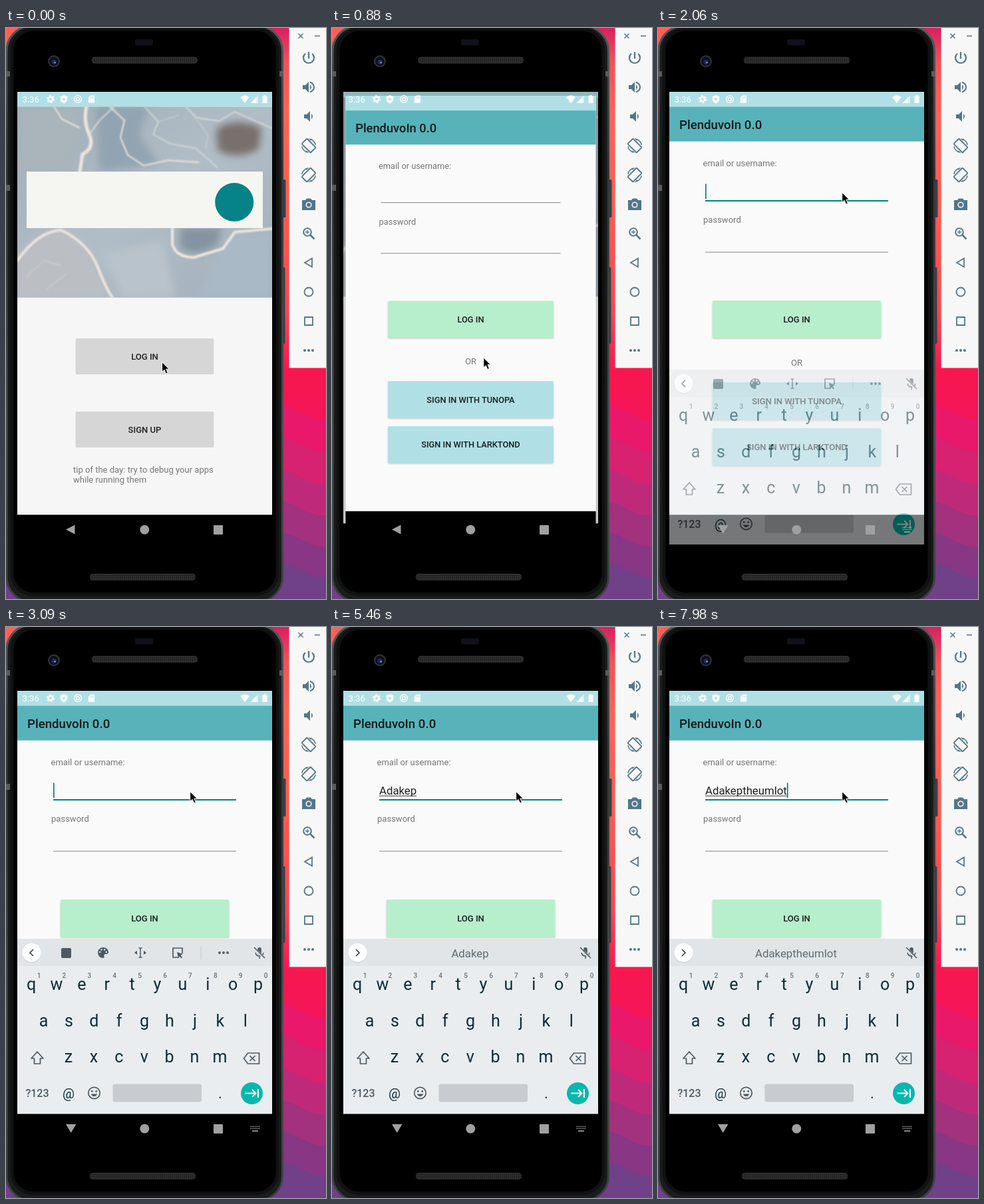
These frames come from a looping animation (481x859 px, 8 s). An HTML page:

```html
<!DOCTYPE html>
<html lang="en">
<head>
<meta charset="utf-8">
<title>Phone login</title>
<style>
html,body{margin:0;width:100%;height:100%;overflow:hidden;background:#000}
svg{display:block;width:100vw;height:100vh;font-family:Roboto,sans-serif}
</style>
</head>
<body>
<svg id="stage" viewBox="0 0 481 859" preserveAspectRatio="none"></svg>
<script>
const stage = document.getElementById('stage');
const TEAL = '#008577', AQUA = '#b0e0e6', SLATE = '#53768a', KEY = '#0d2c38', DIM = '#4d5a62';

const rect = (x, y, w, h, fill, more = '') =>
  `<rect x="${x}" y="${y}" width="${w}" height="${h}" fill="${fill}" ${more}/>`;
const circle = (x, y, r, fill, more = '') =>
  `<circle cx="${x}" cy="${y}" r="${r}" fill="${fill}" ${more}/>`;
const path = (d, fill, more = '') => `<path d="${d}" fill="${fill}" ${more}/>`;
const line = (d, color, w = 1, more = '') =>
  path(d, 'none', `stroke="${color}" stroke-width="${w}" ${more}`);
const ring = (x, y, r, color, w) => circle(x, y, r, 'none', `stroke="${color}" stroke-width="${w}"`);
const text = (x, y, s, size, fill, more = '') =>
  `<text x="${x}" y="${y}" font-size="${size}" fill="${fill}" ${more}>${s}</text>`;
const MID = 'text-anchor="middle"', MED = 'font-weight="500"', LABEL = `${MID} ${MED}`;
const at = (x, y, body, more = '') => `<g transform="translate(${x} ${y}) ${more}">${body}</g>`;
const gradient = (id, stops, dir = 'x2="0" y2="1"') =>
  `<linearGradient id="${id}" ${dir}>` +
  stops.map(([o, c]) => `<stop offset="${o}" stop-color="${c}"/>`).join('') + '</linearGradient>';
const clip = (id, y, h) => `<clipPath id="${id}">${rect(17, y, 383, h, '#000')}</clipPath>`;

function defs() {
  return '<defs>' +
    gradient('wall', [[0, '#d91f5e'], [.06, '#f4505a'], [.15, '#ff6255'], [.32, '#ff5a4f'],
      [.5, '#ff4350'], [.6, '#f7174f'], [.7, '#f3155b']]) +
    gradient('photo', [[0, '#9fadb8'], [.5, '#b1bdc6'], [1, '#a2b0bc']], 'x2="1" y2="1"') +
    gradient('edge', [[0, '#55585a'], [.25, '#343637'], [.7, '#4a4c4e'], [1, '#3c3e3f']]) +
    '<pattern id="mesh" width="3" height="3" patternUnits="userSpaceOnUse">' +
      rect(0, 0, 3, 3, '#303030') + circle(1.5, 1.5, .9, '#151515') + '</pattern>' +
    '<filter id="soft" x="-20%" y="-20%" width="140%" height="140%"><feGaussianBlur stdDeviation="6"/></filter>' +
    '<filter id="fine" x="-20%" y="-20%" width="140%" height="140%"><feGaussianBlur stdDeviation="1"/></filter>' +
    clip('screen', 96, 681) + clip('hero', 118.4, 287) + '</defs>';
}

function wallpaper() {
  const bands = [[570, '#ea186a'], [618, '#d72171'], [668, '#be2a79'], [715, '#a2317e'], [762, '#873783'], [808, '#704089']];
  return rect(0, 0, 481, 859, 'url(#wall)') + rect(0, 0, 60, 60, '#ff5f55') + bands.map(([y, c]) =>
    path(`M0 ${y}H400C430 ${y - 12} 450 ${y + 22} 481 ${y + 18}V859H0Z`, c)).join('');
}

function phone() {
  const speaker = (x, y) => rect(x, y, 158, 9, 'url(#mesh)', 'rx="4" stroke="#3d3d3d" stroke-width=".8"');
  return rect(415, 228, 5.5, 57, '#3d3f41', 'rx="1.5"') + rect(415, 360, 4.5, 115, '#3d3f41', 'rx="1.5"') +
    rect(1, -3, 414.5, 866, '#1b1c1d', 'rx="37" stroke="url(#edge)" stroke-width="3"') +
    rect(9, 2, 399, 850, '#000', 'rx="32" stroke="#101111" stroke-width="5"') +
    rect(0, 65, 6, 8, '#5a5c5d') + rect(0, 236, 6, 9, '#5a5c5d') + rect(411, 65, 6, 8, '#5a5c5d') +
    speaker(129.5, 44) + speaker(126.5, 821.5) +
    rect(194, 17, 27, 9, '#10111a', 'rx="2.5"') +
    circle(72, 50, 9, '#303133') + circle(72, 50, 6.8, '#0c1020') +
    circle(72, 51, 3.6, '#1b2c61') + circle(73.5, 52, 1.2, '#8da5ee');
}

function photo() {
  const vein = (d, w, c = '#eee5dc') => line(d, c, w, 'filter="url(#fine)" stroke-linecap="round"');
  return `<g clip-path="url(#hero)">` + rect(17, 118, 383, 288, 'url(#photo)') +
    `<g filter="url(#soft)">` +
    path('M17 118H105L118 160L90 216H17Z', '#a9b4bb') +
    path('M135 118H215L200 160L230 205L140 216Z', '#92a4b2') +
    path('M17 345Q50 300 90 302Q130 325 155 405H17Z', '#bbbfc4') +
    path('M316 152Q345 132 384 150L380 182Q348 200 318 184Z', '#77706c') +
    path('M262 300H325L318 326Q290 346 262 332Z', '#8493a1') +
    path('M145 340L235 320L255 405H175Z', '#b9c3cb') +
    path('M330 310H400V405H290Z', '#a9b9c6') + '</g>' +
    vein('M121 118Q116 140 125 160T115 190L111 216', 5) +
    vein('M72 118L84 137L110 150', 2) + vein('M125 160L140 140L162 118', 1.5) +
    vein('M156 118L178 139L172 165L183 191L207 207L244 199L290 202', 2) +
    vein('M208 118L229 141L221 160L247 174L285 181L318 210', 1.5, '#dedddb') +
    vein('M270 118L286 135L320 140L344 126L400 151', 2, '#d7d7d7') +
    vein('M285 135L304 162L300 180M229 141L260 131', 1, '#d7d7d7') +
    vein('M17 350Q48 306 83 304Q124 324 138 360T160 405', 4) +
    vein('M250 301V325Q255 345 283 345L326 332L344 307L400 302', 4) +
    vein('M30 375L57 350L82 357M60 394L90 370', 1, '#d9d5d2') + '</g>';
}

const navBack = () => rect(17, 732.3, 383, 45, '#000');

function welcome() {
  const button = (y, s, id = '') => rect(104.5, y, 208, 54, '#d6d6d6', `rx="2" ${id}`) +
    text(208.5, y + 31.5, s, 13.04, '#202020', LABEL);
  return rect(17, 96, 383, 637, '#f6f6f6') + rect(17, 96, 383, 22.4, AQUA) + photo() +
    rect(31, 216, 355, 85, '#f5f6f1') + circle(343.2, 262, 29, '#058388') +
    button(467, 'LOG IN', 'id="press"') + button(577, 'SIGN UP') +
    text(101, 668.5, 'tip of the day: try to debug your apps', 13.04, '#777') +
    text(101, 683.5, 'while running them', 13.04, '#777') + navBack();
}

function login() {
  const button = (y, s, fill) => rect(81.5, y + 2, 254, 56, '#000', 'opacity=".17" rx="2" filter="url(#fine)"') +
    rect(82, y, 253, 56.5, fill, 'rx="1"') + text(208.5, y + 33, s, 13.04, '#151d1e', LABEL);
  return rect(17, 96, 383, 637, '#fafafa') + rect(17, 96, 383, 22.4, AQUA) +
    rect(17, 118.4, 383, 52.2, '#57b3b9') + text(32, 151.8, 'PlenduvoIn 0.0', 18.64, '#10191a', MED) +
    text(67.5, 208, 'email or username:', 13.04, '#757575') +
    text(68, 293, 'password', 13.04, '#757575') +
    rect(71, 259, 275, 1, '#858585', 'id="field"') + rect(71, 336.7, 275, 1, '#858585') +
    text(71, 252, '', 16.78, '#202020', 'id="typed"') +
    rect(71, 253.6, 0, 1, '#303030', 'id="under"') + rect(71, 234.5, 1.7, 22.5, TEAL, 'id="caret"') +
    button(410, 'LOG IN', '#b7eecb') + text(208.5, 507.5, 'OR', 13.04, '#757575', MID) +
    button(533, 'SIGN IN WITH TUNOPA', AQUA) + button(602, 'SIGN IN WITH LARKTOND', AQUA) + navBack();
}

const dots = (x, y, gap, r, c) => [-1, 0, 1].map(i => circle(x + i * gap, y, r, c)).join('');

function keyboard() {
  const row = (s, x, y, step) => [...s].map((c, i) =>
    text(x + i * step, y, c, 25, KEY, MID)).join('');
  const digits = [...'1234567890'].map((c, i) =>
    text(49.5 + i * 37.9, 527.5, c, 10, '#66747b', LABEL)).join('');
  const tools = rect(83, 483, 15, 15, DIM, 'rx="2"') +
    at(146, 490, path('M0-8A8 8 0 0 0 0 8Q2.6 7 1.3 4.5Q1 2.5 3 2H5Q8 2 8-1Q7-8 0-8Z', DIM) +
      [[-4.8, -1], [-2.5, -4.5], [2.2, -4.5], [4.8, -1]].map(([x, y]) => circle(x, y, 1.3, '#e1e5e8')).join('')) +
    at(202, 490, line('M0-7V7M-2.5-7H2.5M-2.5 7H2.5', DIM, 1.5) +
      path('M-9 0L-5-3V3ZM9 0L5-3V3Z', DIM)) +
    at(258, 490, line('M2 7H-7V-7H7V1', DIM, 1.7) + path('M-1-1L8 2L4.5 4L7 7L5.5 8.5L3 5.5L1 8Z', DIM)) +
    rect(292.5, 480, 1, 20, '#c5cbcf') + dots(327, 490, 6, 1.9, DIM);
  return rect(17, 469, 383, 263.3, '#e9edf0') + rect(17, 469, 383, 41, '#e1e5e8') +
    circle(38.5, 491, 14, '#000', 'opacity=".12"') + circle(38.5, 490, 14, '#fff') +
    line('', '#37444b', 1.7, 'id="chevron"') +
    `<g id="tools">${tools}</g>` + text(207.5, 496.5, '', 16.78, '#5f6b72', `id="hint" ${MID}`) +
    at(381, 490, rect(-2.8, -8, 5.6, 10.5, DIM, 'rx="2.8"') +
      line('M-6 0Q-5 5 0 5Q5 5 6 0M0 5V9', DIM, 1.5) +
      line('M-8-7L7 8', '#e1e5e8', 3.5) + line('M-8-8L8 8', DIM, 1.6)) +
    row('qwertyuiop', 38, 546, 37.9) + digits + row('asdfghjkl', 56.5, 600.5, 37.9) + row('zxcvbnm', 94, 655, 37.9) +
    at(47, 648, line('M0-9L-9 1H-4.5V9H4.5V1H9Z', DIM, 1.7, 'stroke-linejoin="round"')) +
    at(369.5, 649, line('M-12 0L-6-8H11V8H-6ZM-3-4L5 4M5-4L-3 4', DIM, 1.7)) +
    text(47, 707, '?123', 16, DIM, LABEL) + text(94, 709, '@', 20, KEY, MID) +
    ring(132.5, 701, 8.7, DIM, 1.7) +
    circle(129.3, 698.5, 1.4, DIM) + circle(135.7, 698.5, 1.4, DIM) + path('M127.5 702.5H137.5Q132.5 710 127.5 702.5Z', DIM) +
    rect(160.5, 687.5, 133.5, 27, '#c8ccd0', 'rx="3"') + text(322, 709, '.', 22, KEY, MID) +
    circle(369.5, 701.5, 16.5, '#05b8ae') +
    line('M359.5 701.5H375M370 696L375.5 701.5L370 707M379 695V708', '#fff', 2);
}

function status() {
  return text(24.5, 112, '3:36', 13.2, '#fff') +
    ring(67, 107, 3.4, '#fff', 2.6) +
    circle(67, 107, 5.3, 'none', 'stroke="#fff" stroke-width="1.6" stroke-dasharray="2.8 2.75"') +
    path('M87 101L92.3 103V107Q92 111.5 87 113.5Q82 111.5 81.7 107V103Z', '#fff') +
    circle(87, 107, 2, AQUA) + ring(108, 107, 5.4, '#fff', 1.3) + ring(108, 107, 2.4, '#fff', 1.5) +
    path('M127 101.5H133V112.5H123.8V105Z', '#fff') + line('M127.5 103V106M129.5 103V106M131.3 103V106', AQUA, .9) +
    path('M352 104Q359 98.5 366 104L359 113Z', '#fff') + path('M379 101V113H367.5Z', '#fff', 'opacity=".55"') +
    path('M376 104.5V113H367.5Z', '#fff') + path('M385.5 102.5H387.5V101H390.5V102.5H392.5V113H385.5Z', '#fff');
}

function nav() {
  const c = '#a0a0a0';
  return path('M90 754.5L103.5 747.5V761.5Z', c, 'id="back"') + path('M90 748H105.5L97.7 761Z', c, 'id="down"') +
    circle(208.3, 754.8, 7, c) + rect(312, 748, 14, 14, c, 'rx="1"') +
    `<g id="keysIcon">` + line('M367.5 751.5H381.5M367.5 754.5H381.5', c, 1.7, 'stroke-dasharray="1.7 1.3"') +
    line('M370 758.2H379', c, 1.7) + '</g>';
}

function sidebar() {
  const s = (d, w = 2) => line(d, SLATE, w);
  // a tilted device outline with an arc at two opposite corners
  const turn = rect(-9.4, -5.6, 18.8, 11.2, 'none', `rx="1.2" transform="rotate(45)" stroke="${SLATE}" stroke-width="1.8"`) +
    s('M3-9.7Q9-7 10.2-1.2M-3 9.7Q-9 7-10.2 1.2', 1.5) +
    path('M-.6-11L5-9.8L3-7.4ZM.6 11L-5 9.8L-3 7.4Z', SLATE);
  const horn = path('M-9-3H-5L0-8V8L-5 3H-9Z', SLATE) + path('M2-4Q6 0 2 4Z', SLATE);
  const icons = [
    s('M0-9V1M-5-6.5A8 8 0 1 0 5-6.5', 2.2),
    horn + s('M2-7.5Q8-5 8 0T2 7.5'),
    at(2, 0, horn),
    turn, at(0, 0, turn, 'scale(-1 1)'),
    path('M-10-6H-5L-3-8.5H3L5-6H10V9H-10Z', SLATE) + circle(0, 1, 4.6, '#f7f7f7') + circle(0, 1, 3, SLATE),
    ring(-2, -2, 5.8, SLATE, 2) + s('M2.5 2.5L8.5 8.5', 2.5) + s('M-5-2H1M-2-5V1', 1.3),
    s('M-6 0L5-6.5V6.5Z', 1.8),
    ring(0, 0, 6.5, SLATE, 1.8),
    s('M-6-6H6V6H-6Z', 1.8),
    dots(0, 0, 6, 2, SLATE)
  ];
  return rect(425.6, 0, 56, 511.4, '#f7f7f7') + line('M439.5 8.5L446.5 15.5M446.5 8.5L439.5 15.5M464 12H472', '#587485', 1.5) +
    icons.map((icon, i) => at(455, 45 + i * 44, icon)).join('');
}

stage.innerHTML = defs() + wallpaper() + phone() +
  `<g clip-path="url(#screen)"><g id="welcome">${welcome()}</g>` +
  rect(17, 96, 383, 681, '#000', 'id="shade" opacity=".19"') + `<g id="login">${login()}</g>` +
  `<g id="keyboard">${keyboard()}</g></g>` + status() + nav() + sidebar() +
  path('M0 0V14.8L3.4 11.7L6 17.5L8.7 16.3L6.2 10.7H10.8Z', '#000', 'id="pointer" stroke="#fff" stroke-width="1"');

const el = id => document.getElementById(id);
const set = (id, attrs) => { for (const k in attrs) el(id).setAttribute(k, attrs[k]); };
const show = (id, on) => set(id, { visibility: on ? 'visible' : 'hidden' });

const NAME = 'Adakeptheumlot';
const KEY_TIMES = [3530, 4120, 4270, 4570, 4710, 5010, 5610, 5750, 5890, 6940, 7090, 7240, 7390, 7980];
// Held steps: [start, value...]
const OPENING = [[0, 0], [880, .88], [1030, .97], [1180, 1]];
const POINTER = [[0, 234.5, 502.5], [300, 227.8, 496], [1180, 234, 464], [1330, 252, 373], [1470, 270, 284], [1620, 276.7, 247.5]];
const SLIDE = [[0, 61, 0], [2050, 45, .5], [2200, 0, 1]];
const CARET = [[0, false], [2050, true], [2490, false], [3090, true], [3980, false], [4120, true],
  [5460, false], [5610, true], [6340, false], [6940, true]];
const held = (steps, t) => steps.filter(s => s[0] <= t).pop().slice(1);
const zoom = k => `translate(208.5 436.5) scale(${k}) translate(-208.5 -436.5)`;

function draw(t) {
  const [open] = held(OPENING, t), [px, py] = held(POINTER, t), [drop, alpha] = held(SLIDE, t);
  set('welcome', { transform: zoom(1 + .05 * open) });
  set('login', { transform: zoom(.85 + .15 * open) });
  show('login', open > 0);
  show('shade', open > 0);
  set('press', { fill: t >= 590 ? '#c7c7c7' : '#d6d6d6' });
  set('pointer', { transform: `translate(${px} ${py})` });

  const focus = t >= 1770, keys = alpha > 0;
  set('field', { fill: focus ? TEAL : '#858585', height: focus ? 2 : 1 });
  set('keyboard', { transform: `translate(0 ${drop})`, opacity: alpha });
  show('back', !keys);
  show('down', keys);
  show('keysIcon', keys);

  const typed = NAME.slice(0, KEY_TIMES.filter(k => k <= t).length);
  el('typed').textContent = el('hint').textContent = typed;
  const width = typed ? el('typed').getComputedTextLength() : 0;
  set('under', { width });
  set('caret', { x: 71 + width });
  show('caret', held(CARET, t)[0]);
  set('chevron', { d: typed ? 'M36 485L41 490L36 495' : 'M41 485L36 490L41 495' });
  set('tools', { display: typed ? 'none' : 'inline' });
}

const start = performance.now();
function tick() {
  draw((performance.now() - start) % 8000);
  requestAnimationFrame(tick);
}
tick();
</script>
</body>
</html>
```
